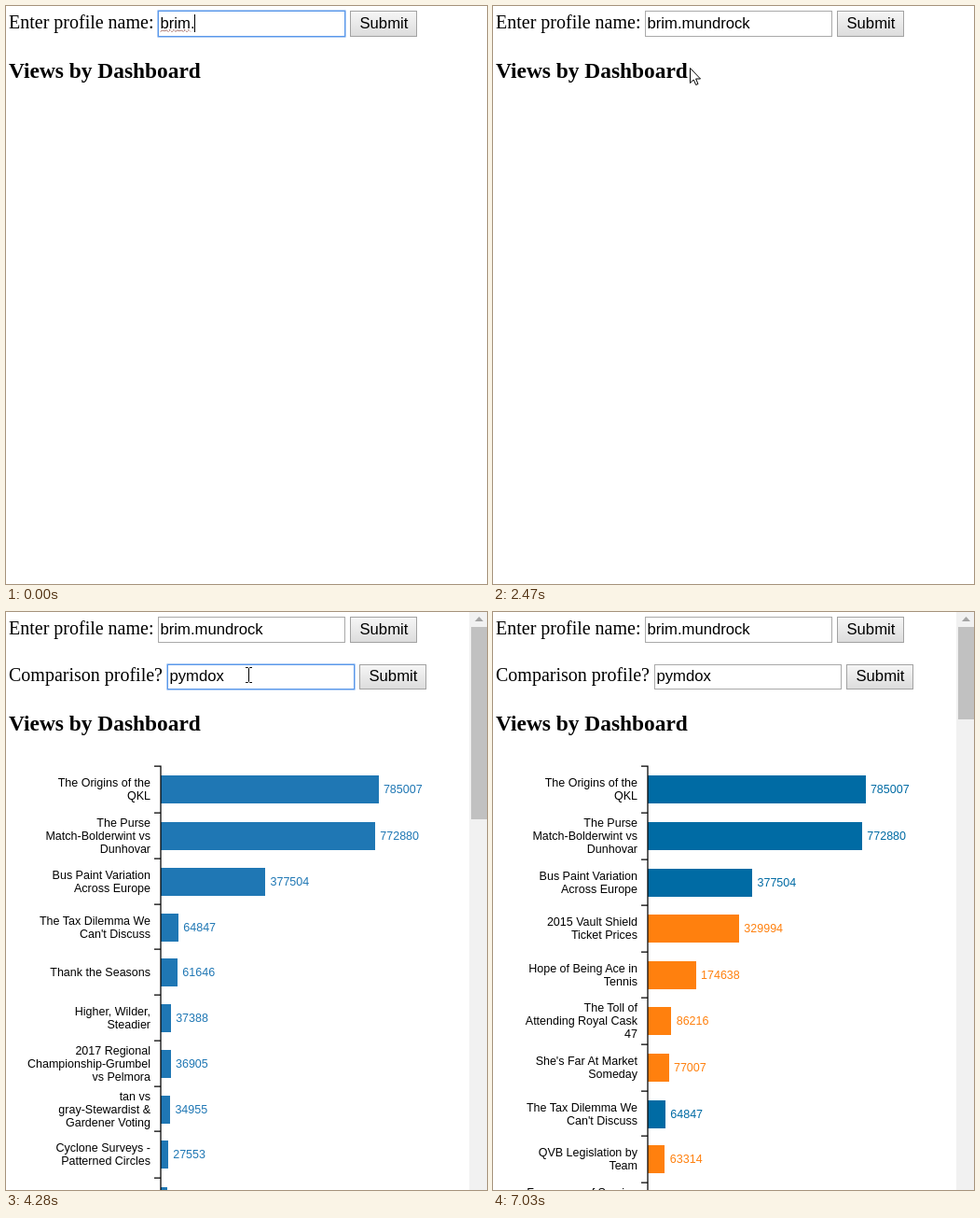
An HTML page for the animation above (7.27 s loop, 516x619 px).

```html
<!DOCTYPE html>
<html lang="en">
<head>
<meta charset="utf-8">
<title>Views by Dashboard</title>
<style>
html, body { margin: 0; width: 100%; height: 100%; overflow: hidden; background: #fff; }
svg { display: block; width: 516px; height: 619px; }
text { white-space: pre; }
.serif { font: 20px "Liberation Serif", "Times New Roman", serif; }
.heading { font: bold 23.4px "Liberation Serif", "Times New Roman", serif; }
.control { font: 16.67px "Liberation Sans", Arial, sans-serif; }
.chart { font: 12.5px "Liberation Sans", Arial, sans-serif; }
.chart rect { shape-rendering: crispEdges; }
.label { text-anchor: end; }
</style>
</head>
<body>
<svg id="stage" viewBox="0 0 516 619">
  <defs>
    <linearGradient id="idle" x2="0" y2="1"><stop stop-color="#f6f6f6"/><stop offset="1" stop-color="#dcdcdc"/></linearGradient>
    <linearGradient id="hover" x2="0" y2="1"><stop stop-color="#f9f9f9"/><stop offset="1" stop-color="#e0e0e0"/></linearGradient>
    <linearGradient id="pressed" x2="0" y2="1"><stop stop-color="#dcdcdc"/><stop offset="1" stop-color="#f2f2f2"/></linearGradient>
  </defs>
</svg>
<script>
const LOOP = 7270, RESULTS = 2700, COMPARED = 6020;
const BLUE = '#1f77b4', NAVY = '#006ba4', ORANGE = '#ff800e';
const stage = document.getElementById('stage');

function add(parent, tag, attrs = {}, content = '') {
  const node = document.createElementNS('http://www.w3.org/2000/svg', tag);
  for (const key in attrs) node.setAttribute(key, attrs[key]);
  node.textContent = content;
  return parent.appendChild(node);
}
const set = (node, attrs) => { for (const key in attrs) node.setAttribute(key, attrs[key]); };
const show = (node, visible) => { node.style.display = visible ? '' : 'none'; };
const between = (t, a, b) => t >= a && t < b;

// A prompt with its input field and submit button.
function formRow(prompt, fieldX, top, bottom) {
  const group = add(stage, 'g');
  const height = bottom - top, baseline = bottom - 9, buttonX = fieldX + 206;
  add(group, 'text', { x: 3, y: baseline, class: 'serif' }, prompt);
  const frame = add(group, 'rect', { fill: '#fff' });
  const text = add(group, 'text', { x: fieldX + 2.5, y: baseline, class: 'control' });
  const caret = add(group, 'rect', { y: baseline - 15, width: 1, height: 19 });
  const button = add(group, 'rect', { x: buttonX + .5, y: top + .5, width: 71, height: height - 1 });
  add(group, 'text', { x: buttonX + 10.5, y: baseline, class: 'control' }, 'Submit');

  const covers = (p, x, width) => p && between(p[0], x, x + width) && between(p[1], top, bottom);
  const outline = (inset, stroke, width) => set(frame, {
    x: fieldX + inset, y: top + inset, width: 201 - 2 * inset, height: height - 2 * inset,
    stroke, 'stroke-width': width
  });

  return {
    group,
    fieldCovers: p => covers(p, fieldX, 201),
    draw({ value, focused, caretOn, pressed, pointer }) {
      if (focused) outline(.25, '#5a98ea', 1.5);
      else outline(.5, '#a9a9a9', 1);
      if (text.textContent !== value) text.textContent = value;
      show(caret, focused && caretOn);
      const end = value ? text.getComputedTextLength() : 0;
      set(caret, { x: Math.floor(fieldX + 2.5 + end) });
      const over = covers(pointer, buttonX, 72);
      set(button, {
        fill: `url(#${pressed ? 'pressed' : over ? 'hover' : 'idle'})`,
        stroke: over ? '#707070' : '#a2a2a2'
      });
    }
  };
}

function chart(tops, rows) {
  const group = add(stage, 'g', { class: 'chart' });
  rows.forEach(([label, value, color], i) => {
    const width = value * 2.98e-4, middle = tops[i] + 15;
    add(group, 'rect', { x: 166, y: tops[i], width: Math.floor(width + .1), height: 30, fill: color });
    add(group, 'text', { x: 171 + width, y: middle + 4.3, fill: color }, String(value));
    const lines = label.split('|');
    lines.forEach((line, k) => add(group, 'text', {
      x: 155, y: middle + 4 + (k - (lines.length - 1) / 2) * 13.9, class: 'label'
    }, line));
  });
  const ticks = tops.map(top => `M159 ${top - 10}H166`).join('');
  add(group, 'path', { d: `M166 164.4V619${ticks}`, fill: 'none', stroke: '#000', 'stroke-width': 1.25 });
  return group;
}

const first = formRow('Enter profile name: ', 163, 5, 33);
const second = formRow('Comparison profile? ', 173, 56, 83);
const heading = add(stage, 'text', { x: 3, class: 'heading' }, 'Views by Dashboard');

let zigzag = 'M166 27.5';
for (let x = 168; x <= 198; x += 2) zigzag += `L${x} ${x % 4 ? 27.5 : 25.5}`;
const squiggle = add(stage, 'path', { d: zigzag, fill: 'none' });

const single = chart([175, 225, 274, 323, 371, 420, 469, 518, 566, 616], [
  ['The Origins of the|QKL', 785007, BLUE],
  ['The Purse|Match-Bolderwint vs|Dunhovar', 772880, BLUE],
  ['Bus Paint Variation|Across Europe', 377504, BLUE],
  ["The Tax Dilemma We|Can't Discuss", 64847, BLUE],
  ['Thank the Seasons', 61646, BLUE],
  ['Higher, Wilder,|Steadier', 37388, BLUE],
  ['2017 Regional|Championship-Grumbel|vs Pelmora', 36905, BLUE],
  ['tan vs|gray-Stewardist &|Gardener Voting', 34955, BLUE],
  ['Cyclone Surveys -|Patterned Circles', 27553, BLUE],
  ['The Origins of YBDA|Teams', 26500, BLUE]
]);
const merged = chart([175, 225, 275, 324, 374, 423, 473, 523, 571, 621], [
  ['The Origins of the|QKL', 785007, NAVY],
  ['The Purse|Match-Bolderwint vs|Dunhovar', 772880, NAVY],
  ['Bus Paint Variation|Across Europe', 377504, NAVY],
  ['2015 Vault Shield|Ticket Prices', 329994, ORANGE],
  ['Hope of Being Ace in|Tennis', 174638, ORANGE],
  ['The Toll of|Attending Royal Cask|47', 86216, ORANGE],
  ["She's Far At Market|Someday", 77007, ORANGE],
  ["The Tax Dilemma We|Can't Discuss", 64847, NAVY],
  ['QVB Legislation by|Team', 63314, ORANGE],
  ['Frequency of Scoring|by Each|Club', 61646, ORANGE]
]);

const scrollbar = add(stage, 'g');
add(scrollbar, 'rect', { x: 497, width: 19, height: 619, fill: '#f1f1f1' });
add(scrollbar, 'path', { d: 'M503 10L507.5 5L512 10Z', fill: '#a3a3a3' });
const thumb = add(scrollbar, 'rect', { x: 499, y: 16, width: 17, fill: '#c1c1c1' });

const arrow = add(stage, 'path', {
  d: 'M.5 .5V16.5L4.2 13L6.7 18.5L9 17.5L6.6 12H11.5Z', fill: '#fff', stroke: '#000'
});
const beam = add(stage, 'path', {
  d: 'M-3 -7.5H-.5L.5 -6.5L1.5 -7.5H4M.5 -6.5V7M-3 8.5H-.5L.5 7.5L1.5 8.5H4',
  fill: 'none', stroke: '#000'
});

// Pointer path as [time, x, y]; the pointer is out of sight before and after it.
const PATH = [
  [830, 318, 30], [910, 345, 27], [1050, 388, 21], [1070, 393, 20], [1540, 393, 20],
  [1690, 384, 36], [1800, 348, 50], [1950, 286, 62], [2160, 250, 67], [2390, 211, 66],
  [2700, 211, 66], [2850, 213, 65], [4200, 213, 65], [4250, 251, 68], [4440, 320, 59],
  [4600, 392, 64], [4680, 405, 67], [5620, 405, 67]
];

function pointerAt(t) {
  const begin = PATH[0][0];
  if (!between(t, begin, PATH[PATH.length - 1][0])) return null;
  const tick = Math.max(begin, t - t % 75);
  const i = PATH.findIndex(p => tick < p[0]);
  const [t0, x0, y0] = PATH[i - 1], [t1, x1, y1] = PATH[i];
  const k = (tick - t0) / (t1 - t0);
  return [Math.round(x0 + (x1 - x0) * k), Math.round(y0 + (y1 - y0) * k)];
}

const typed = (word, times, t) => word.slice(0, times.filter(at => at <= t).length);
const FIRST_KEYS = [90, 170, 240, 390, 470, 540, 690, 770];
const SECOND_KEYS = [3100, 3240, 3430, 3580, 3830, 3980];

function draw(t) {
  const pointer = pointerAt(t), results = t >= RESULTS, compared = t >= COMPARED;
  const editing = t < 1420;

  first.draw({
    value: 'brim.' + typed('mundrock', FIRST_KEYS, t),
    focused: editing, caretOn: true, pressed: between(t, 1420, 1540), pointer
  });
  second.draw({
    value: typed('pymdox', SECOND_KEYS, t),
    focused: between(t, 2860, 4740), caretOn: between(t, 3100, 4280),
    pressed: between(t, 4740, 4820), pointer
  });

  show(squiggle, editing);
  set(squiggle, t < 170
    ? { stroke: '#7a2a20', 'stroke-dasharray': '2 1.2' }
    : { stroke: '#d03a30', 'stroke-dasharray': 'none' });

  show(second.group, results);
  show(scrollbar, results);
  show(single, results && !compared);
  show(merged, compared);
  set(heading, { y: results ? 127 : 77 });
  set(thumb, { height: compared ? 99 : 206 });

  const overField = first.fieldCovers(pointer) || (results && second.fieldCovers(pointer));
  show(arrow, pointer && !overField);
  show(beam, pointer && overField);
  if (pointer) set(overField ? beam : arrow, { transform: `translate(${pointer})` });
}

const start = performance.now();
function frame() {
  draw((performance.now() - start) % LOOP);
  requestAnimationFrame(frame);
}
frame();
</script>
</body>
</html>
```
